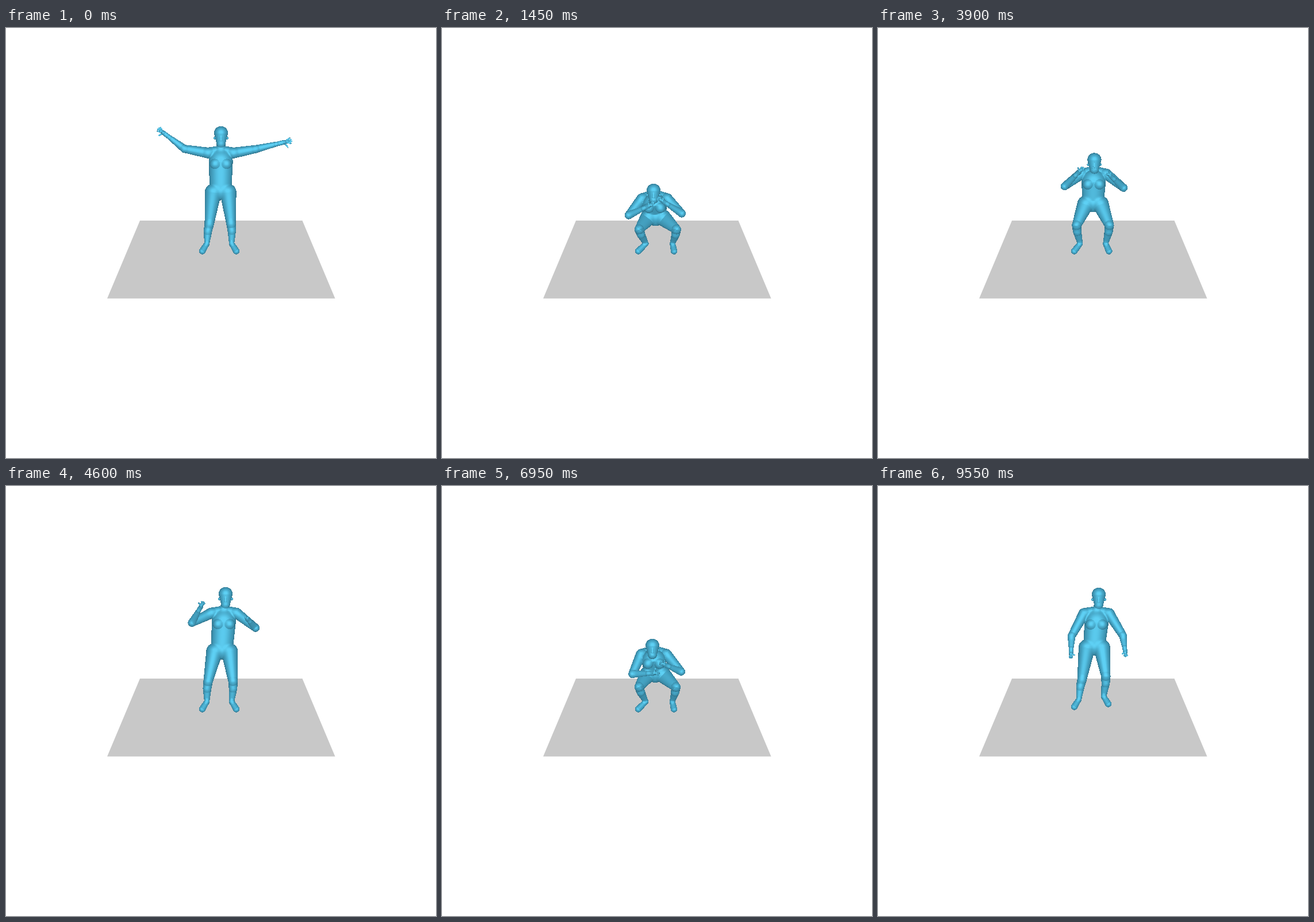
Write an HTML page with a canvas that moves like this. It is 748 by 748 pixels and loops after 9600 ms.

```html
<!DOCTYPE html>
<html lang="en">
<head>
<meta charset="utf-8">
<title>Body motion</title>
<style>
  html, body { margin: 0; width: 100%; height: 100%; overflow: hidden; background: #fff; }
  canvas { display: block; }
</style>
</head>
<body>
<canvas id="stage" width="748" height="748"></canvas>
<script>
const LOOP = 9600, STEP = 50;
const ctx = document.getElementById('stage').getContext('2d');

// Window of the stage in which the body is shaded.
const LEFT = 240, TOP = 155, W = 270, H = 250;
const BLEND = 2;
const layer = document.createElement('canvas');
layer.width = W;
layer.height = H;
const layerCtx = layer.getContext('2d');
const image = layerCtx.createImageData(W, H);
const height = new Float64Array(W * H);

const lerp = (a, b, w) => a + (b - a) * w;
const between = (a, b, w) => a.map((v, i) => lerp(v, b[i], w));
const shift = (p, x, y, z) => [p[0] + x, p[1] + y, p[2] + z];
const smooth = s => s * s * (3 - 2 * s);
const clamp = (v, lo, hi) => Math.max(lo, Math.min(hi, v));

// A pose is the head, both wrists relative to it, and the forward reach of the wrists.
const pose = (head, left, right, reach) => [...head, ...left, ...right, reach];
const open = pose([374, 183], [-90, 7], [96, 19], 0);
const crouch = pose([368, 283], [-18, 31], [25, 24], 38);
const guard = pose([372, 262], [-22, 26], [28, 22], 42);
const handsUp = pose([382, 188], [-47, 29], [42, 48], 38);
const squat = pose([366, 278], [-8, 48], [29, 36], 40);
const rise = pose([381, 196], [-45, 57], [44, 56], 56);
const relaxed = pose([384, 189], [-48, 94], [45, 92], 28);

const mix = (a, b, w, armW = w) => a.map((v, i) => lerp(v, b[i], i < 2 ? w : armW));
const raise = (p, up) => p.map((v, i) => i === 1 ? v - up : v);

const keys = [
  [0, open], [1000, mix(open, crouch, 0.67, 0.95)], [1450, crouch],
  [2000, mix(crouch, guard, 0.15)], [3000, guard], [4000, mix(guard, handsUp, 0.5)],
  [4600, handsUp], [5300, raise(handsUp, 3)], [6050, mix(handsUp, squat, 0.43)],
  [6500, mix(handsUp, squat, 0.92)], [6950, squat], [7500, mix(squat, rise, 0.1)],
  [8000, mix(squat, rise, 0.54)], [8200, rise],
  [8600, raise(mix(rise, relaxed, 0.5), 15)], [9050, raise(mix(rise, relaxed, 0.85), 11)],
  [9550, relaxed]
];

function slope(i, j) {
  const [ta, a] = keys[Math.max(i - 1, 0)], [tb, b] = keys[Math.min(i + 1, keys.length - 1)];
  return (b[j] - a[j]) / (tb - ta);
}

function poseAt(time) {
  let i = 0;
  while (i < keys.length - 2 && time >= keys[i + 1][0]) i++;
  const [ta, a] = keys[i], [tb, b] = keys[i + 1];
  const span = tb - ta, s = Math.min(1, (time - ta) / span);
  const into = s * (1 - s) ** 2, out = s * s * (s - 1);
  return a.map((v, j) =>
    lerp(v, b[j], smooth(s)) + span * (into * slope(i, j) + out * slope(i + 1, j)));
}

// Middle joint of a limb with two bones, bent towards the pole.
function joint(a, b, at, bone, pole) {
  const half = Math.hypot(b[0] - a[0], b[1] - a[1], b[2] - a[2]) / 2;
  const bend = Math.sqrt(Math.max(0, bone * bone - half * half));
  return shift(between(a, b, at), ...pole.map(v => v * bend));
}

// Tapered round limb added to the height field; overlaps melt together.
function limb(a, ra, b, rb, depth = 1) {
  const [ax, ay, az] = a, dx = b[0] - ax, dy = b[1] - ay, dz = b[2] - az;
  const flat = dx * dx + dy * dy || 1e-6;
  const x0 = Math.max(0, Math.floor(Math.min(ax - ra, b[0] - rb) - LEFT));
  const x1 = Math.min(W - 1, Math.ceil(Math.max(ax + ra, b[0] + rb) - LEFT));
  const y0 = Math.max(0, Math.floor(Math.min(ay - ra, b[1] - rb) - TOP));
  const y1 = Math.min(H - 1, Math.ceil(Math.max(ay + ra, b[1] + rb) - TOP));
  for (let y = y0; y <= y1; y++) {
    for (let x = x0; x <= x1; x++) {
      const px = x + LEFT + 0.5 - ax, py = y + TOP + 0.5 - ay;
      const t = clamp((px * dx + py * dy) / flat, 0, 1), r = lerp(ra, rb, t);
      const rest = r * r - (px - dx * t) ** 2 - (py - dy * t) ** 2;
      if (rest > 0) {
        height[y * W + x] += Math.exp((az + dz * t + Math.sqrt(rest) * depth) / BLEND);
      }
    }
  }
}

const ball = (p, r) => limb(p, r, p, r);

function hand(wrist, tip, side) {
  const palm = between(wrist, tip, 0.5);
  const dx = tip[0] - wrist[0], dy = tip[1] - wrist[1];
  const finger = (angle, reach) => {
    const c = Math.cos(angle) * reach, s = Math.sin(angle) * reach;
    limb(palm, 1.8, [wrist[0] + dx * c - dy * s, wrist[1] + dx * s + dy * c, tip[2]], 1.2);
  };
  limb(wrist, 4, palm, 4);
  for (let i = 0; i < 4; i++) finger((i - 1.5) * 0.12, 1 - Math.abs(i - 1.5) * 0.05);
  finger(side * 0.5, 0.75);
}

function buildBody(time) {
  const [headX, headY, leftX, leftY, rightX, rightY, reach] = poseAt(time);
  const wrists = [[headX + leftX, headY + leftY, reach], [headX + rightX, headY + rightY, reach]];
  const low = (headY - 193) / 85, bent = Math.max(0, low);
  const step = smooth(clamp((time - 7800) / 500, 0, 1));

  const crown = [headX, headY, 5 + 28 * bent];
  const chin = shift(crown, 0, 17 - 2 * bent, 1);
  const pelvis = [lerp(373, headX, 0.3), 285 + 38 * low - 7 * step, 0];
  const chest = [(headX + pelvis[0]) / 2, headY + 47 - 20 * low, crown[2] * 0.4];
  const nape = shift(chest, 0, -20, -chest[2]);
  const face = between(crown, chin, 0.5);

  limb(crown, 12.2, chin, 8);
  limb(shift(face, 0, -3, 8.5), 1.4, shift(face, 0, 4, 10), 2);
  limb(shift(chin, 0, 0, -3), 7.5, nape, 8);
  limb(chest, 21, pelvis, 19, 0.75);

  [-1, 1].forEach((side, n) => {
    const wrist = wrists[n];
    const shoulder = shift(chest, side * 22, -15 + 3 * bent, -chest[2] * 0.5);
    const elbow = joint(shoulder, wrist, 0.5, 38, [side * 0.72, 0.6, 0]);
    const tip = between(elbow, wrist, 1.75);
    const hip = shift(pelvis, side * 13, 5, 2);
    const ankle = [371 + side * 21.5 + bent * (6.5 + side * 1.5), 375 - step * (6.5 + side * 2.5), 0];
    const knee = joint(hip, ankle, 0.62, 45, [side * 0.34, -0.2, 0.8]);
    const calf = shift(between(knee, ankle, 0.35), side, 0, -1);
    const toe = shift(ankle, side * 8 - 5 * bent, 13, 8);

    ball(shift(face, side * 10.6, 0, -2), 2.4);
    ball(shift(chest, side * 10, 4, 9), 9);
    limb(nape, 8, shoulder, 9.5);
    limb(shoulder, 9.5, elbow, 7);
    limb(elbow, 7, wrist, 4.2);
    hand(wrist, tip, side);
    limb(hip, 14.5, knee, 8.2);
    limb(knee, 8.2, calf, 7.4);
    limb(calf, 7.4, ankle, 4.6);
    limb(ankle, 4.8, toe, 5.8);
  });
}

// The gentler neighbour difference keeps the edges between limbs crisp.
function gradient(k, stride) {
  const back = height[k] - height[k - stride], ahead = height[k + stride] - height[k];
  return clamp(Math.abs(back) < Math.abs(ahead) ? back : ahead, -8, 8);
}

function shade() {
  const px = image.data;
  px.fill(0);
  for (let k = 0; k < W * H; k++) height[k] = Math.log(height[k]) * BLEND;
  for (let k = W; k < W * (H - 1); k++) {
    if (height[k] === -Infinity) continue;
    const gx = gradient(k, 1), gy = gradient(k, W);
    const light = clamp((1 + 0.12 * gy) / Math.hypot(gx, gy, 1), 0, 1);
    const gloss = light ** 12;
    px.set([
      40 + 32 * light + 22 * gloss,
      94 + 78 * light + 36 * gloss,
      114 + 92 * light + 38 * gloss,
      255
    ], k * 4);
  }
  layerCtx.putImageData(image, 0, 0);
}

function drawFloor() {
  ctx.fillStyle = '#fff';
  ctx.fillRect(0, 0, 748, 748);
  ctx.fillStyle = '#c8c8c8';
  ctx.beginPath();
  ctx.moveTo(233, 335);
  ctx.lineTo(515.5, 335);
  ctx.lineTo(572.5, 470.5);
  ctx.lineTo(176, 470.5);
  ctx.fill();
}

let shown = -1;
function frame() {
  const time = Math.floor(performance.now() % LOOP / STEP) * STEP;
  if (time !== shown) {
    shown = time;
    height.fill(0);
    buildBody(time);
    shade();
    drawFloor();
    ctx.drawImage(layer, LEFT, TOP);
  }
  requestAnimationFrame(frame);
}
frame();
</script>
</body>
</html>
```
